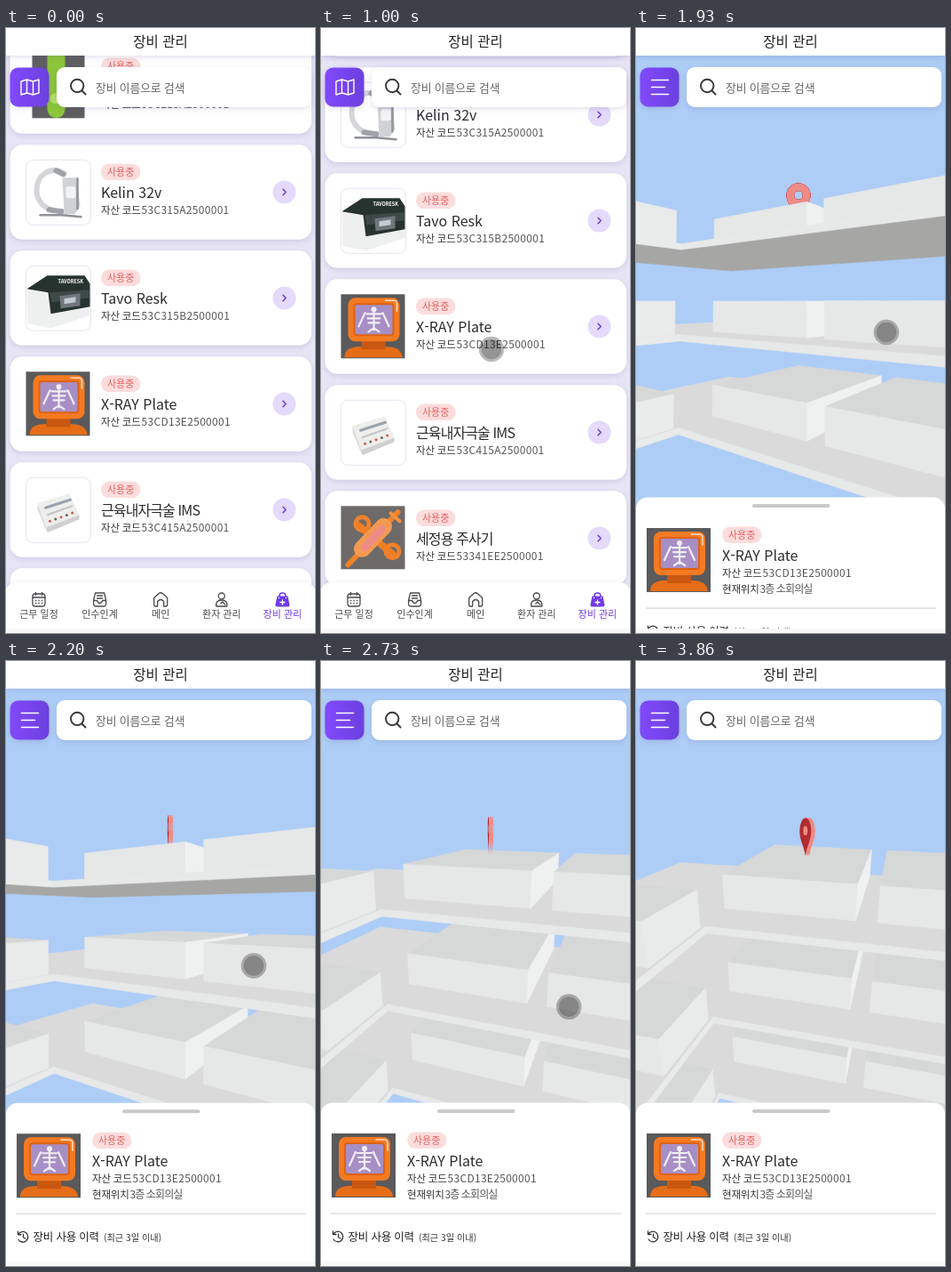
Recreate the animation shown at these times as an HTML page. Size 348 px wide and 680 px high, loop 3930 ms.

```html
<!DOCTYPE html>
<html lang="ko">
<head>
<meta charset="utf-8">
<style>
html, body { margin: 0; width: 348px; height: 680px; overflow: hidden; background: #fff; }
svg { display: block; font-family: "Noto Sans CJK KR", "Noto Sans CJK", "Noto Sans", sans-serif; }
.soft { filter: drop-shadow(0 2px 3px rgba(70, 50, 130, .15)); }
.line { fill: none; stroke-linecap: round; stroke-linejoin: round; }
.name { font-size: 16px; font-weight: 500; fill: #2b2b2f; }
.ko { letter-spacing: -.9px; }
.key { font-size: 11.5px; letter-spacing: -.2px; fill: #333; }
.val { font-size: 12px; font-weight: 300; fill: #555; }
.code { letter-spacing: .3px; }
.mid { text-anchor: middle; }
#scene polygon { stroke-width: .5; }
</style>
</head>
<body>
<svg id="stage" width="348" height="680" viewBox="0 0 348 680"></svg>
<script>
const DUR = 3930, STEP = 200 / 3;

const line = (d, color, w = 1.3) => `<path class="line" d="${d}" stroke="${color}" stroke-width="${w}"/>`;
const rect = (x, y, w, h, fill, r = 0) => `<rect x="${x}" y="${y}" width="${w}" height="${h}" rx="${r}" fill="${fill}"/>`;
const path = (d, fill) => `<path d="${d}" fill="${fill}"/>`;
const dot = (x, y, r, fill) => `<circle cx="${x}" cy="${y}" r="${r}" fill="${fill}"/>`;
const text = (x, y, cls, str) => `<text x="${x}" y="${y}" class="${cls}">${str}</text>`;

// Device pictures, 72 x 72
const frame = '<rect width="73" height="73" rx="8" fill="#fff" stroke="#e6e4f3"/>';
const art = {
  green: rect(7, 0, 59, 72, '#5f5f62') + line('M34 4v58', '#8cc63a', 20) +
    line('M26 48h18', '#8cc63a', 18) + dot(33, 50, 6, '#b4de64'),
  arm: frame + line('M43 15C28 6 12 17 12 34 12 46 20 54 31 57', '#d5d6da', 6) +
    line('M42 16l-8-4M26 56l14 2', '#9fa2a8', 6) + path('M41 20h16l4 32 -6 9H43z', '#d0d2d6') +
    rect(45, 30, 11, 13, '#f3f3f5', 2) + line('M58 21v34M40 62l22 2M16 62h24', '#8f9298', 2.5),
  oven: frame + path('M1 27 23 12H66l6 8V56L28 70 2 65z', '#eef0ef') +
    path('M1 26 24 11H66l6 9V46L28 54 25 30z', '#27332f') + path('M27 30l44-3v9l-42 5z', '#3f4a48') +
    path('M38 34l23-3v14l-22 3z', '#70777c') + path('M43 37l13-2v6l-13 2z', '#c4cad0') +
    '<text x="36" y="20" font-size="5.5" font-weight="700" fill="#fff">TAVORESK</text>',
  xray: rect(0, 0, 72, 72, '#5a595b') + path('M4 71Q4 60 18 59H54Q68 60 69 71z', '#e56d18') +
    rect(23, 48, 27, 14, '#c9570f') + rect(8, 4, 58, 49, '#f47a22', 8) + rect(14, 10, 46, 37, '#dd6212', 4) +
    rect(16, 12, 42, 33, '#a78fc6', 2) +
    line('M37 16v24M29 22h16M30 27h14M31 32h12M27 21l-7 15M47 21l7 15M31 42l6-4 6 4', '#f1edf5', 2.2) +
    dot(37, 17, 3, '#f1edf5') + line('M50 7h9q4 0 4 4v8', '#ffdcc4', 1.6),
  panel: frame + path('M13 29l36-11 11 24 -37 14z', '#eeeeec') + path('M23 56l37-14v5L24 62z', '#d0d0d0') +
    path('M13 29l10 27 1 6L13 36z', '#dcdcdc') + line('M22 34l28-9', '#9aa3ad', 3) + line('M24 42l28-10', '#c6c6c6', 2) +
    [0, 1, 2, 3, 4].map(i => dot(27 + i * 6.3, 49 - i * 2.3, 1.5, i % 2 ? '#666' : '#d8574c')).join(''),
  syringe: rect(0, 0, 72, 71, '#6d6a69') + line('M8 66L64 7', '#f08328', 6) +
    line('M20 22L58 54', '#ee7d22', 8) + line('M24 48L48 23', '#f39a52', 19) + line('M27 46L46 26', '#ef8c86', 9) +
    '<g fill="none" stroke="#f0802a" stroke-width="5"><circle cx="24" cy="20" r="7.5"/><circle cx="58" cy="51" r="7.5"/></g>' +
    line('M56 8l10 9', '#f29240', 4)
};

const badge = (x, y) => rect(x, y, 44.5, 18.5, '#fddcdc', 9.2) +
  `<text x="${x + 22.2}" y="${y + 13.2}" class="mid" font-size="11" fill="#e4605e">사용중</text>`;

const items = [
  ['', '53C215A2500001', 'green'],
  ['Kelin 32v', '53C315A2500001', 'arm'],
  ['Tavo Resk', '53C315B2500001', 'oven'],
  ['X-RAY Plate', '53CD13E2500001', 'xray'],
  ['근육내자극술 IMS', '53C415A2500001', 'panel'],
  ['세정용 주사기', '53341EE2500001', 'syringe']
];
const info = (x, y, name, code) => badge(x, y) +
  text(x, y + 38.5, /[가-힣]/.test(name) ? 'name ko' : 'name', name) +
  text(x, y + 56.3, 'key', '자산 코드') + text(x + 45.5, y + 56.3, 'val code', code);
const card = ([name, code, pic], i) => `<g transform="translate(0 ${12.3 + i * 119})">
  <g class="soft">${rect(4.5, 0, 339.5, 106.5, '#fff', 14)}</g>
  <g transform="translate(22.5 17)">${art[pic]}</g>${info(107, 21.3, name, code)}
  ${dot(313.5, 53.2, 13, '#e4dafc')}${line('M312 50l3.2 3.2-3.2 3.2', '#6a3bd8', 1.5)}</g>`;

// Bottom tabs, icons centred on 0,0
const tabs = [
  ['근무 일정', c => `<rect x="-7" y="-6.5" width="14" height="14" rx="3" fill="none" stroke="${c}" stroke-width="1.3"/>` +
    line('M-7-2.5H7M-3.5-8v3M3.5-8v3', c) + `<path d="M-4 1H5M-4 4H5" stroke="${c}" stroke-width="1.4" stroke-dasharray="1.4 2"/>`],
  ['인수인계', c => line('M-5-7.5H5l2 8v4q0 3-3 3h-8q-3 0-3-3v-4zM-7 1h4q1 3 3 3t3-3h4M-3-4.5h6M-3-1.5h6', c)],
  ['메인', c => line('M-7.5-2L-2-7q2-1.500 4 0l5.500 5v7.500q0 2-2 2h-2V2q-3.500-4-7 0v5.500h-2q-2 0-2-2z', c)],
  ['환자 관리', c => `<circle cy="-4" r="3.5" fill="none" stroke="${c}" stroke-width="1.3"/>` +
    line('M-6 7.500q-1-7 6-7t6 7zM-1 4.500l2-2 3 3', c)],
  ['장비 관리', c => line('M-3.500-4q0-3.500 3.500-3.500t3.500 3.500', c, 1.6) +
    path('M-6-4H6l2 10q0 2-2 2H-6q-2 0-2-2z', c) + line('M0 .5v5M-2.500 3h5M-4-2h.1M4-2h.1', '#fff', 1.4)]
];
const tab = ([label, icon], i) => {
  const c = i === 4 ? '#6f3be6' : '#4a4a4e';
  return `<g transform="translate(${37 + i * 68.6} 642.5)">${icon(c)}
    <text class="mid" y="20" font-size="11" font-weight="${i === 4 ? 500 : 400}" fill="${c}">${label}</text></g>`;
};

const PIN = 'M0 0C-3-11-13.5-16-13.5-27A13.5 13.5 0 0 1 13.5-27C13.5-16 3-11 0 0zM-5-27a5 5 0 1 0 10 0a5 5 0 1 0-10 0z';
const pinArt = `<g id="pin">${`<path d="${PIN}" fill-rule="evenodd"/>`.repeat(9)}</g>`;

// Faces of one rack level, back to front
const boxes = { main: [-1.4, 0, 0, 1.8], next: [.21, 3, 0, 1.8], side: [-3, -1.39, -1.39, -.57] };
const face = (id, c) => `<polygon id="${id}" fill="${c}" stroke="${c}"/>`;
const level = n => face('shelf' + n, '#dadadb') + Object.keys(boxes).map(k =>
  face(k + 'Top' + n, '#d6d7d7') + (k === 'main' && n === 0 ? pinArt : '') +
  face(k + 'Front' + n, '#e6e7e7') + face(k + 'Right' + n, k === 'main' ? '#eff0f0' : '#e9eaea')).join('') +
  face('wing' + n, '#e9eaea') + face('edge' + n, '#e7e8e8') + face('under' + n, '#a6a6a5');

document.getElementById('stage').innerHTML = `
<defs>
  <linearGradient id="violet"><stop stop-color="#8149fb"/><stop offset="1" stop-color="#6c40df"/></linearGradient>
  <clipPath id="body"><rect y="31" width="348" height="644"/></clipPath>
</defs>
<g clip-path="url(#body)">
  <g id="listPage">${rect(0, 31, 348, 644, '#e7e5f5')}<g id="list">${items.map(card).join('')}</g></g>
  <g id="mapPage">${rect(0, 31, 348, 644, '#adcdf6')}<g id="scene">${level(2) + level(1) + level(0)}</g></g>
  <g class="soft">${rect(-1, 623, 350, 70, '#fff', 13)}</g>${tabs.map(tab).join('')}
  <g id="sheet">
    ${rect(0, 496.5, 348, 220, '#fff', 13)}${rect(131, 504, 87.5, 4, '#c9c9cb', 2)}
    <g transform="translate(12 531)">${art.xray}</g>${info(97, 529.5, 'X-RAY Plate', '53CD13E2500001')}
    ${text(97, 604, 'key', '현재위치') + text(139.5, 604, 'val ko', '3층 소회의실')}
    ${rect(11, 620.3, 327, 1.5, '#dedee0')}
    ${line('M14 644a5.8 5.8 0 1 1 0 6M13.5 641v3.5h3.5M19.5 644v3.5l2.5 1.5', '#333')}
    <text x="30.5" y="652" font-size="12.5" letter-spacing="-.2" fill="#222">장비 사용 이력</text>
    <text x="110" y="651.5" font-size="10.2" fill="#333">(최근 3일 이내)</text>
  </g>
</g>
${rect(0, 675, 348, 5, '#f8f8f9')}
<g class="soft">${rect(0, 0, 348, 31, '#fff')}</g>
<text x="174" y="21" class="mid" font-size="15.5" font-weight="500" fill="#222">장비 관리</text>
<g class="soft">${rect(57, 44, 287, 45, '#fff', 9)}</g>
<g class="soft">${rect(4.5, 44.5, 44, 44, 'url(#violet)', 9)}</g>
<g id="mapIcon">${line('M17 60l6.5-2 7 2 6.5-2v15l-6.5 2-7-2-6.5 2zM23.5 58v15M30.5 60v15', '#fff', 1.4)}</g>
<g id="menuIcon">${line('M17.5 58.5h19M17.5 66.5h15M17.5 74.5h19', '#fff', 1.6)}</g>
<circle cx="80.2" cy="65" r="7.2" fill="none" stroke="#3a3a3e" stroke-width="2"/>${line('M85.5 70.5l4 4', '#3a3a3e', 2)}
<text x="101" y="71.5" font-size="12.8" font-weight="300" letter-spacing="-.1" fill="#666">장비 이름으로 검색</text>
<g id="cursor">${dot(0, 0, 14.3, 'rgba(0,0,0,.27)') + dot(0, 0, 11.3, 'rgba(0,0,0,.2)')}</g>`;

// Camera: box corner to the right, ahead and below; yaw and pitch in degrees
const views = [
  [.166, 3.915, -1.03, 37, -3.04],
  [.337, 3.91, -.38, 29, 4],
  [.642, 3.534, 1, 15.3, 20.3]
];
const pinTips = [[183, 215, 1], [187, 212, 1], [193, 219, 1.05]];
const cursorPath = [[467, 172, 542], [867, 172, 455], [1000, 192, 361], [1400, 284, 340], [1667, 289, 338],
  [1933, 282, 342], [2467, 276, 343], [2800, 280, 400], [3067, 320, 590], [3267, 348, 625], [3400, 366, 660]];
const LEVEL = 1.02, BOX = .373, SLAB = .073;
const outline = [[-3.02, 1.87], [3, 1.87], [3, -.52], [-1.36, -.52], [-1.36, -2.2], [-3.02, -2.2]];

const $ = id => document.getElementById(id);
const clamp = (v, a = 0, b = 1) => Math.min(b, Math.max(a, v));
const lerp = (a, b, u) => a + (b - a) * u;
const mix = (a, b, u) => a.map((v, i) => lerp(v, b[i], u));
const smooth = u => u * u * (3 - 2 * u);
const easeOut = u => 1 - (1 - u) ** 3;
const rad = deg => deg * Math.PI / 180;
const show = (id, on) => $(id).style.display = on ? '' : 'none';
const move = (id, x, y) => $(id).setAttribute('transform', `translate(${x} ${y})`);
const poly = (id, pts) => $(id).setAttribute('points', pts.map(p => p.map(v => v.toFixed(2)).join()).join(' '));
const at = (poses, k) => k < 1 ? mix(poses[0], poses[1], k) : mix(poses[1], poses[2], k - 1);

function track(keys, t) {
  let i = 1;
  while (i < keys.length - 1 && keys[i][0] < t) i++;
  const [a, b] = [keys[i - 1], keys[i]];
  return mix(a, b, clamp((t - a[0]) / (b[0] - a[0]))).slice(1);
}

// Returns a projector for x (right), z (back), y (down)
function camera(k) {
  const [right, ahead, below, yaw, pitch] = at(views, k);
  const c = Math.cos(rad(yaw)), s = Math.sin(rad(yaw)), cp = Math.cos(rad(pitch)), sp = Math.sin(rad(pitch));
  const project = (x, z, y) => {
    const r = right + x * c + z * s, f = ahead - x * s + z * c, d = below + y;
    const depth = f * cp + d * sp;
    return [174 + 433 * r / depth, 285 + 433 * (d * cp - f * sp) / depth];
  };
  return { project, below };
}

function drawRack(n, { project, below }) {
  const top = n * LEVEL, floor = top + BOX, base = floor + SLAB;
  const flat = y => outline.map(([x, z]) => project(x, z, y));
  const wall = (x0, z0, x1, z1, a, b) => [project(x0, z0, a), project(x1, z1, a), project(x1, z1, b), project(x0, z0, b)];
  for (const [k, [x0, x1, z0, z1]] of Object.entries(boxes)) {
    poly(k + 'Top' + n, below + top > 0 ? [...wall(x0, z0, x1, z0, top, top).slice(0, 2), project(x1, z1, top), project(x0, z1, top)] : []);
    poly(k + 'Front' + n, wall(x0, z0, x1, z0, top, floor));
    poly(k + 'Right' + n, wall(x1, z0, x1, z1, top, floor));
  }
  const [, , far, corner, near] = outline;
  poly('shelf' + n, below + floor > 0 ? flat(floor) : []);
  poly('edge' + n, wall(...corner, ...far, floor, base));
  poly('wing' + n, wall(...near, ...corner, floor, base));
  poly('under' + n, below + base < 0 ? flat(base) : []);
}

function drawPin(k, t) {
  const [x, y, s] = at(pinTips, k);
  const turn = ((t - 1933) * .34 + 810) % 180 - 90, a = rad(turn);
  const shade = u => `rgb(${mix([174, 38, 42], [237, 139, 134], clamp(u)).map(Math.round)})`;
  const front = shade((turn + 65) / 50), rim = shade(turn < 0 ? 1 : .3);
  const copies = [...$('pin').children], last = copies.length - 1;
  copies.forEach((c, i) => {
    const dx = Math.sin(a) * 5 * (i / last - .5);
    c.setAttribute('transform', `translate(${x + dx} ${y}) scale(${s * Math.max(.05, Math.cos(a))} ${s})`);
    c.setAttribute('fill', i === last ? front : rim);
  });
}

function render(ms) {
  const t = ms < 393 ? 0 : 400 + Math.floor((ms - 393) / STEP) * STEP;
  const onMap = t > 1460;
  show('listPage', !onMap);
  show('mapIcon', !onMap);
  show('mapPage', onMap);
  show('menuIcon', onMap);
  move('list', 0, -87 * smooth(clamp((t - 340) / 527)));

  const built = t > 1790;
  show('scene', built);
  if (built) {
    const k = t < 2466 ? Math.max(-.3, (t - 1933.3) / 533.4) : 1 + Math.sin(clamp((t - 2466.7) / 580) * Math.PI / 2);
    const cam = camera(k);
    for (let n = 0; n < 3; n++) drawRack(n, cam);
    drawPin(k, t);
  }
  show('sheet', t > 1680);
  move('sheet', 0, 179 * (1 - easeOut(clamp((t - 1667) / 602))));

  show('cursor', t > 460 && t < 3400);
  move('cursor', ...track(cursorPath, t));
}

const start = performance.now();
(function tick() {
  render((performance.now() - start) % DUR);
  requestAnimationFrame(tick);
})();
</script>
</body>
</html>
```
